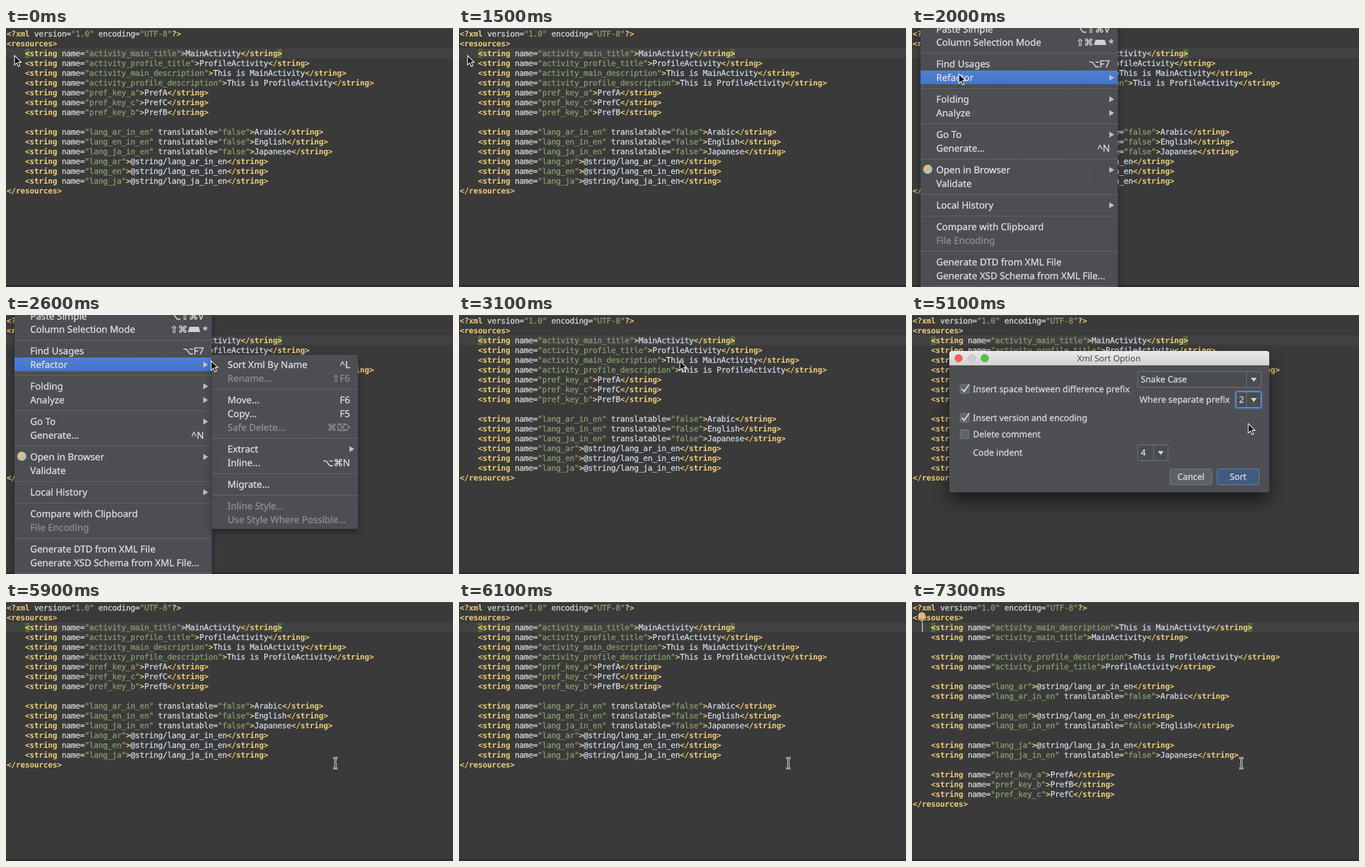
An HTML page that plays this animation: 682 by 396 pixels, repeating every 7400 ms.

```html
<!DOCTYPE html>
<html lang="en">
<head>
<meta charset="utf-8">
<title>Sort XML by name</title>
<style>
  html, body { margin: 0; width: 100%; height: 100%; overflow: hidden; background: #3a3a3a; }
  svg { display: block; width: 682px; height: 396px; }
  text { white-space: pre; text-rendering: geometricPrecision; }
  text, tspan { fill: currentColor; stroke: currentColor; stroke-width: .3px; }
  .code { font: 12px "DejaVu Sans Mono", monospace; letter-spacing: -.224px; }
  .tag { color: #edcd78; font-weight: bold; stroke-width: 0; }
  .attr { color: #d6d6d3; }
  .value { color: #8b9c6d; }
  .body { color: #d0d7e3; }
  .brace { color: #fff04a; font-weight: bold; stroke-width: 0; }
  .menu { font: 14.4px "Noto Sans", "DejaVu Sans", sans-serif; color: #dededf; }
  .form { font: 13.25px "Noto Sans", "DejaVu Sans", sans-serif; color: #d8d9da; }
  .bar { font-size: 13px; color: #484848; stroke-width: 0; }
  .off { color: #8e9092; }
  .end { text-anchor: end; }
  .mid { text-anchor: middle; }
</style>
</head>
<body>
<svg id="stage" viewBox="0 0 682 396" xmlns="http://www.w3.org/2000/svg"></svg>
<script>
const LOOP = 7400, STEP = 100;
const COL = 7, ROW = 15, LEFT = 1;

const escape = s => s.replace(/&/g, '&amp;').replace(/</g, '&lt;').replace(/>/g, '&gt;');
const text = (x, y, s, cls) => `<text x="${x}" y="${y}" class="${cls}">${escape(s)}</text>`;
const rect = (x, y, w, h, fill, more = '') =>
  `<rect x="${x}" y="${y}" width="${w}" height="${h}" fill="${fill}" ${more}/>`;
const group = (id, content, more = '') => `<g id="${id}" ${more}>${content}</g>`;

// Editor

const entry = (name, value, fixed) =>
  `    <string name="${name}"${fixed ? ' translatable="false"' : ''}>${value}</string>`;
const title = key => entry(`activity_${key.toLowerCase()}_title`, key + 'Activity');
const about = key => entry(`activity_${key.toLowerCase()}_description`, `This is ${key}Activity`);
const pref = key => entry('pref_key_' + key.toLowerCase(), 'Pref' + key);
const lang = code => entry('lang_' + code, `@string/lang_${code}_in_en`);
const langName = (code, name) => entry(`lang_${code}_in_en`, name, true);
const wrap = lines =>
  ['<?xml version="1.0" encoding="UTF-8"?>', '<resources>', ...lines, '</resources>'];

const unsorted = wrap([
  title('Main'), title('Profile'), about('Main'), about('Profile'),
  pref('A'), pref('C'), pref('B'), '',
  langName('ar', 'Arabic'), langName('en', 'English'), langName('ja', 'Japanese'),
  lang('ar'), lang('en'), lang('ja')
]);
const sorted = wrap([
  about('Main'), title('Main'), '',
  about('Profile'), title('Profile'), '',
  lang('ar'), langName('ar', 'Arabic'), '',
  lang('en'), langName('en', 'English'), '',
  lang('ja'), langName('ja', 'Japanese'), '',
  pref('A'), pref('B'), pref('C')
]);

function codeLine(line, row) {
  let inside = false;
  const spans = (line.match(/<[?\/]?\w+|\??>|"[^"]*"|[^<>"?]+/g) || []).map(part => {
    let cls = inside ? 'attr' : 'body';
    if (part[0] === '<') { cls = 'tag'; inside = true; }
    else if (part.endsWith('>')) { cls = 'tag'; inside = false; }
    else if (part[0] === '"') cls = 'value';
    return `<tspan class="${cls}">${escape(part)}</tspan>`;
  });
  return `<text x="${LEFT}" y="${13 + row * ROW}" class="code">${spans.join('')}</text>`;
}

function codeDoc(id, lines) {
  const braces = [[4, '<'], [lines[2].length - 1, '>']].map(([col, ch]) => {
    const x = LEFT + col * COL;
    return rect(x, 32, COL, 14, '#52654a') + text(x, 43, ch, 'code brace');
  });
  return group(id, lines.map(codeLine).join('') + braces.join(''));
}

const bulb = group('bulb',
  '<circle cx="15" cy="21" r="5.6" fill="#e6b877"/>' +
  rect(12.5, 25.5, 5, 2.5, '#d3a566') + rect(13, 28, 4, 2, '#8d8d8d'));

// Menus

const arrowRight = (x, y) => `<path d="M${x} ${y - 4.5}l7.5 4.5l-7.5 4.5z" fill="#bfc0c2"/>`;

function menuPanel(x, w, rows, lines) {
  const items = rows.map(([cy, label, key, off]) => {
    const cls = 'menu' + (off ? ' off' : '');
    return text(x + 24, cy + 5, label, cls) +
      (key === '>' ? arrowRight(x + w - 13, cy) : key ? text(x + w - 12, cy + 5, key, cls + ' end') : '');
  });
  return lines.map(y => rect(x, y, w, 1, '#626467')).join('') + items.join('');
}
const panel = (x, y, w, h) =>
  rect(x, y, w, h, '#4d4f52', 'fill-opacity=".97" filter="url(#menuShadow)"');

const mainRows = [
  [2, 'Paste Simple', '⌥⇧⌘V'], [22, 'Column Selection Mode'],
  [55, 'Find Usages', '⌥F7'], [76, 'Refactor', '>'],
  [109, 'Folding', '>'], [130, 'Analyze', '>'],
  [163, 'Go To', '>'], [184, 'Generate...', '^N'],
  [217, 'Open in Browser', '>'], [238, 'Validate'],
  [271, 'Local History', '>'],
  [304, 'Compare with Clipboard'], [325, 'File Encoding', '', true],
  [358, 'Generate DTD from XML File'], [379, 'Generate XSD Schema from XML File...']
];
const subRows = [
  [76, 'Sort Xml By Name', '^L'], [97, 'Rename...', '⇧F6', true],
  [130, 'Move...', 'F6'], [151, 'Copy...', 'F5'], [172, 'Safe Delete...', '⌘⌦', true],
  [205, 'Extract', '>'], [226, 'Inline...', '⌥⌘N'],
  [259, 'Migrate...'],
  [292, 'Inline Style...', '', true], [313, 'Use Style Where Possible...', '', true]
];
const keyboard = text(277, 27, '⇧⌘', 'menu end') +
  '<path d="M280 18h14l2.5 8h-19z" fill="#cfd0d2"/>' + text(300, 28, '*', 'menu');
const globe = '<circle cx="24" cy="216" r="7" fill="#a3bfe0"/>' +
  '<path d="M19 212q4-4 8-2l2 4l-4 1l1 5l-4 2l-2-4l-2-2z" fill="#e2bd6c"/>';

const mainMenu = group('mainMenu',
  panel(13, -20, 301, 440) +
  rect(13, 65, 301, 21, 'url(#pick)', 'id="mainPick"') +
  menuPanel(13, 301, mainRows, [38, 92, 146, 200, 254, 287, 341, 394]) +
  keyboard + globe);
const subMenu = group('subMenu',
  panel(314, 61, 223, 266) +
  rect(314, 65, 223, 21, 'url(#pick)', 'id="subPick"') +
  menuPanel(314, 223, subRows, [113, 188, 242, 275]));

// Dialog

const label = (x, cy, s, cls = '') => text(x, cy + 5, s, 'form ' + cls);

function combo(x, y, w, value, focus) {
  const split = x + w - 23;
  return (focus ? rect(x - 1, y - 1, w + 2, 27, 'none', 'rx="3" stroke="#476da6" stroke-width="2"') : '') +
    rect(x + .5, y + .5, w - 1, 24, '#494d50', `rx="2" stroke="${focus ? '#7fa3d8' : '#75787a'}"`) +
    rect(split, y + 1, 1, 23, '#707375') +
    `<path d="M${split + 7} ${y + 10}h9l-4.5 6z" fill="#d3d4d5"/>` +
    label(x + 5, y + 12, value);
}
const checkbox = (y, on) =>
  rect(73.5, y + .5, 13.5, 13.5, '#606467', 'rx="2" stroke="#7e8183"') +
  (on ? `<path d="M76 ${y + 7}l3.6 4.2l7.8-11" fill="none" stroke="#d5d6d7" stroke-width="2"/>` : '');
const button = (x, name, fill, line) =>
  rect(x + .5, 235.5, 64, 24, fill, `rx="2.5" stroke="${line}"`) + label(x + 32.5, 247, name, 'mid');
const light = (x, fill, line) =>
  `<circle cx="${x}" cy="66" r="5.7" fill="${fill}" stroke="${line}" stroke-width=".7"/>`;

const dialog = group('dialog',
  rect(57, 55, 488, 216, '#4d5052', 'rx="4" filter="url(#dialogShadow)"') +
  '<path d="M57 77v-18q0-4 4-4h480q4 0 4 4v18z" fill="url(#bar)"/>' +
  light(71, '#fb5f57', '#df4a43') + light(91, '#cfcfcf', '#b6b6b6') + light(111, '#52c04a', '#3fa337') +
  label(300.5, 66, 'Xml Sort Option', 'bar mid') +
  checkbox(106, true) + label(93, 113, 'Insert space between difference prefix') +
  checkbox(150, true) + label(93, 157, 'Insert version and encoding') +
  checkbox(175, false) + label(93, 182, 'Delete comment') +
  label(93, 210, 'Code indent') +
  combo(344, 86, 189, 'Snake Case') +
  label(347, 129, 'Where separate prefix') + combo(494, 117, 39, '2', true) +
  combo(344, 198, 47, '4') +
  button(393, 'Cancel', '#5c6164', '#777b7e') + button(465, 'Sort', '#415b7e', '#6480a6'));

// Pointers

const arrow = group('arrow',
  '<path d="M0 0V14.5L3.4 11.4L5.7 16.7L8.2 15.6L5.9 10.4H10.3Z" fill="#0c0c0c" stroke="#f4f4f4" stroke-width="1.1"/>');
const beamPath = 'M-3.5-7.5Q0-7.5 0-5Q0-7.5 3.5-7.5M0-5V6M-3.5 8.5Q0 8.5 0 6Q0 8.5 3.5 8.5M-2 2.5H2';
const beam = group('beam',
  `<path d="${beamPath}" fill="none" stroke="#ececec" stroke-width="2.8"/>` +
  `<path d="${beamPath}" fill="none" stroke="#2a2a2a" stroke-width="1"/>`,
  'transform="translate(502.5 246)"');

const shadow = (id, dy, blur, alpha) =>
  `<filter id="${id}" x="-20%" y="-20%" width="140%" height="160%">
     <feDropShadow dx="0" dy="${dy}" stdDeviation="${blur}" flood-color="#000" flood-opacity="${alpha}"/>
   </filter>`;
const fade = (id, from, to) =>
  `<linearGradient id="${id}" x2="0" y2="1"><stop stop-color="${from}"/><stop offset="1" stop-color="${to}"/></linearGradient>`;

const stage = document.getElementById('stage');
stage.innerHTML =
  `<defs>${shadow('menuShadow', 5, 6, .4)}${shadow('dialogShadow', 14, 14, .55)}
   ${fade('pick', '#4f80d2', '#4474c9')}${fade('bar', '#ebebeb', '#d1d1d1')}</defs>` +
  rect(0, 0, 682, 396, '#3a3a3a') + rect(0, 0, 682, 1, '#505050') +
  rect(0, 31, 682, 15, '#424242') + rect(0, 393, 682, 3, '#302c2e') +
  codeDoc('before', unsorted) + codeDoc('after', sorted) +
  rect(15, 31, 1.5, 15, '#c4c4c4', 'id="caret"') + bulb +
  mainMenu + subMenu + dialog + arrow + beam;

const ui = {};
stage.querySelectorAll('[id]').forEach(el => ui[el.id] = el);
const show = (name, on) => ui[name].style.display = on ? '' : 'none';

// Pointer stops: time, x, y
const path = [
  [1600, 13, 42], [1900, 45, 70], [2400, 300, 70], [2600, 313, 70], [2800, 337, 70],
  [3600, 337, 70], [4200, 521, 129], [4600, 521, 129], [5000, 513, 166], [5200, 513, 166],
  [5700, 502, 246]
];

function pointerAt(t) {
  const i = path.findIndex(stop => stop[0] > t);
  if (i === 0) return path[0].slice(1);
  if (i < 0) return path[path.length - 1].slice(1);
  const [t0, x0, y0] = path[i - 1], [t1, x1, y1] = path[i];
  const k = (t - t0) / (t1 - t0), e = k * k * (3 - 2 * k);
  return [x0 + (x1 - x0) * e, y0 + (y1 - y0) * e];
}

function draw(t) {
  const [x, y] = pointerAt(t);
  const menuOpen = t >= 1600 && t < 3000;
  const isSorted = t >= 6200;
  const usesBeam = t >= 5900;

  show('before', !isSorted);
  show('after', isSorted);
  show('bulb', t >= 6800);
  show('caret', t >= 6300 && (t - 6300) % 1000 < 500);
  show('mainMenu', menuOpen);
  show('mainPick', y >= 65);
  show('subMenu', menuOpen && t >= 2100);
  show('subPick', x >= 314);
  show('dialog', t >= 3300 && t < 5900);
  show('arrow', !usesBeam);
  show('beam', usesBeam);
  ui.arrow.setAttribute('transform', `translate(${x.toFixed(1)} ${y.toFixed(1)})`);
}

function tick() {
  draw(Math.floor(performance.now() % LOOP / STEP) * STEP);
  requestAnimationFrame(tick);
}
tick();
</script>
</body>
</html>
```
